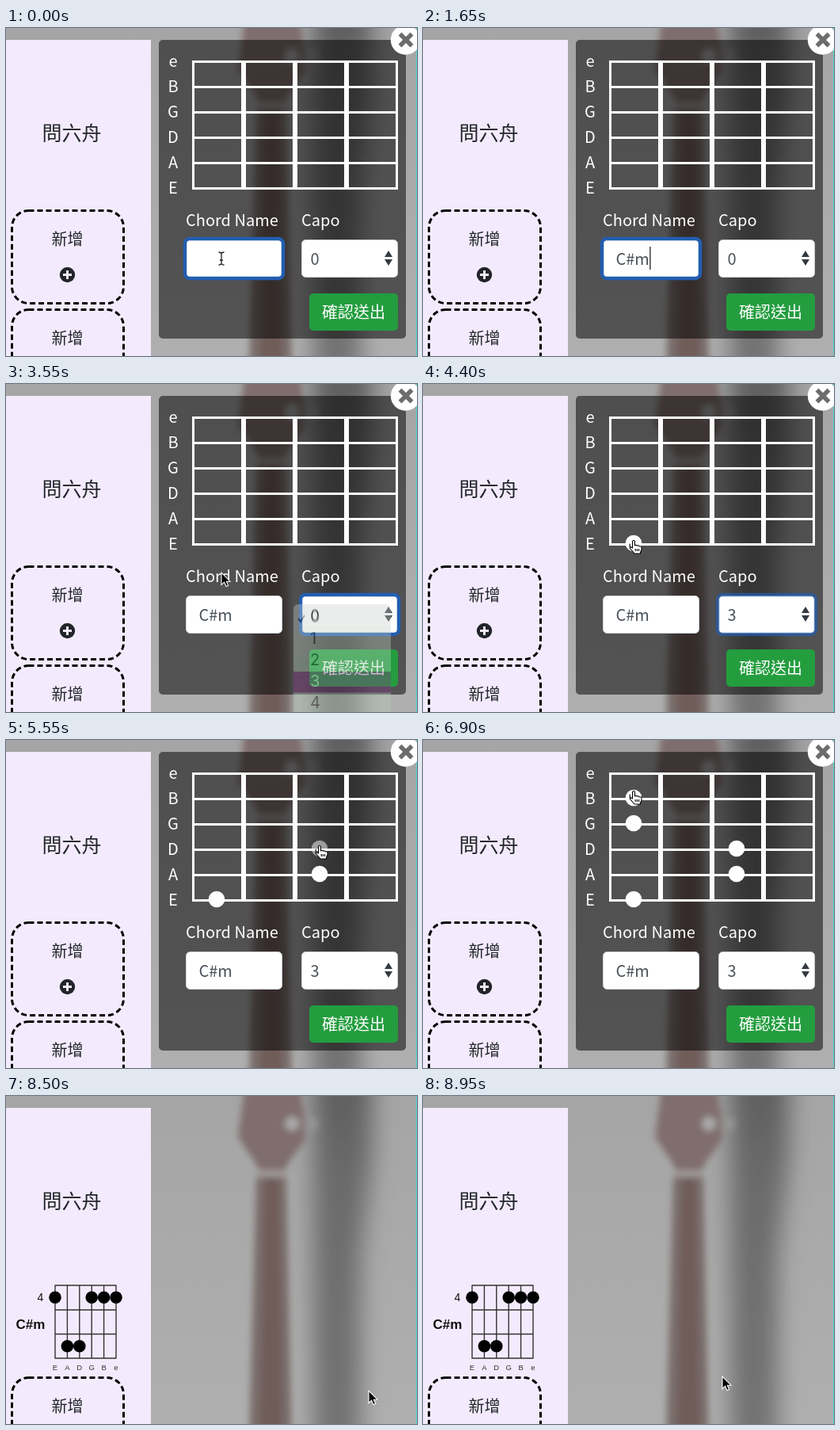
An HTML page for the animation above (9 s loop, 519 by 414 pixels).

```html
<!DOCTYPE html>
<html lang="zh-Hant">
<head>
<meta charset="utf-8">
<title>Chord editor</title>
<style>
  html, body { margin: 0; width: 100%; height: 100%; overflow: hidden; background: #a9a9a9; }
  svg { display: block; }
  text { font: 20px "Noto Sans CJK TC", "Noto Sans CJK SC", "Noto Sans CJK JP", "Noto Sans CJK", "Noto Sans", sans-serif; fill: #212529; }
  .mid { text-anchor: middle; }
  .light text { fill: #fff; }
  .light .field { fill: #495057; }
  #menu text { font-family: Inter, Roboto, sans-serif; fill: #111; }
  #diagram text { font: 14px "Liberation Sans", Arial, sans-serif; fill: #111; }
  #diagram .tiny { font-size: 9.5px; fill: #333; }
  #diagram .name { font-size: 17px; font-weight: bold; }
</style>
</head>
<body>
<svg width="519" height="414" viewBox="0 0 519 414">
  <defs>
    <filter id="soft" x="-30%" y="-30%" width="160%" height="160%"><feGaussianBlur stdDeviation="4"/></filter>
    <filter id="wide" x="-60%" y="-30%" width="220%" height="160%"><feGaussianBlur stdDeviation="15"/></filter>
    <linearGradient id="wall" x2="0" y2="1">
      <stop stop-color="#a5a5a5"/><stop offset="1" stop-color="#afafaf"/>
    </linearGradient>
    <linearGradient id="shade" x2="0" y2="1">
      <stop stop-color="#5c5c5c"/><stop offset=".3" stop-color="#6b6b6b"/><stop offset="1" stop-color="#737373"/>
    </linearGradient>
    <linearGradient id="glass" x2="0" y2="1">
      <stop stop-color="#cbd0cd"/><stop offset=".2" stop-color="#c6d0c9"/>
      <stop offset=".5" stop-color="#b1d2b9"/><stop offset="1" stop-color="#b9cabd"/>
    </linearGradient>
    <g id="card">
      <rect x="7.5" y="230.5" width="141" height="117" rx="21" fill="none" stroke="#000" stroke-width="3" stroke-dasharray="7 4"/>
      <text class="mid" x="77.5" y="274">新增</text>
      <circle cx="77.5" cy="311.5" r="9.7" fill="#212529"/>
      <path d="M72 311.5h11M77.5 306v11" stroke="#f3ebfd" stroke-width="3"/>
    </g>
    <path id="spin" d="M478 289l5-8 5 8zM478 292h10l-5 8z" fill="#343a40"/>
  </defs>

  <rect width="519" height="414" fill="url(#wall)"/>
  <path d="M388-40H462V80L448 200V460H388z" fill="url(#shade)" filter="url(#wide)"/>
  <g filter="url(#soft)">
    <path d="M302-15H370L377 25 378 55 358 82 352 94H320L312 80 293 52z" fill="#806d6d"/>
    <path d="M316 102H354L361 430H307z" fill="#796d6b"/>
    <path d="M327 104H344L349 430H321z" fill="#6f5c59"/>
    <path d="M318 98H354" stroke="#a29b9a" stroke-width="6"/>
    <circle cx="361" cy="35" r="9" fill="#aaa"/><circle cx="386" cy="35" r="8" fill="#969696"/>
  </g>
  <rect x="518" width="1" height="414" fill="#52d3cf"/>

  <rect y="15" width="183" height="399" fill="#f3ebfd"/>
  <text class="mid" x="83" y="142" style="font-size:25px">問六舟</text>
  <use id="firstCard" href="#card"/>
  <use href="#card" y="125"/>
  <g id="diagram">
    <path d="M62 239V331M77.4 239V331M92.8 239V331M108.2 239V331M123.6 239V331M139 239V331M61.5 239H139.5M61.5 270H139.5M61.5 300.5H139.5M61.5 331H139.5" stroke="#333" stroke-width="1.4"/>
    <text x="39.5" y="259">4</text>
    <text class="name" x="12.5" y="294">C#m</text>
  </g>

  <g id="panel" class="light">
    <rect x="193" y="15" width="312" height="377" rx="5" fill="#000" fill-opacity=".52"/>
    <path id="grid" stroke="#fff" fill="none"/>
    <g id="dots" fill="#fff"></g>
    <text x="227" y="250">Chord Name</text>
    <text x="373" y="250">Capo</text>

    <rect x="227.5" y="267.5" width="121" height="47" rx="5" fill="#fff" stroke="#ced4da"/>
    <rect id="inputRing" x="226" y="266" width="124" height="50" rx="6" fill="none" stroke="#235eb0" stroke-width="4.5"/>
    <text id="chord" class="field" x="243.5" y="299"></text>
    <path id="caret" stroke="#222" stroke-width="1.3"/>

    <rect x="373.5" y="267.5" width="121" height="47" rx="5" fill="#fff" stroke="#ced4da"/>
    <rect id="selectRing" x="372" y="266" width="124" height="50" rx="6" fill="none" stroke="#235eb0" stroke-width="4.5"/>
    <text id="capo" class="field" x="384.5" y="299"></text>
    <use href="#spin"/>

    <rect id="send" x="383" y="335" width="112" height="47" rx="5"/>
    <text class="mid" x="439" y="366" font-weight="500" style="font-weight:500">確認送出</text>

    <circle cx="504.5" cy="15" r="18.7" fill="#fff"/>
    <path d="M497.5 7.5l15 15m0-15l-15 15" stroke="#6c6c6c" stroke-width="5.5"/>
  </g>

  <g id="menu">
    <rect x="363" y="278" width="123" height="150" rx="6" fill="url(#glass)"/>
    <rect id="pick" x="363" width="123" height="26.5" fill="#87348a"/>
    <path id="check" d="M369 296l3 4 5-8" fill="none" stroke="#111" stroke-width="2"/>
  </g>

  <g id="cursor">
    <path id="arrow" d="M0 0V15.5L3.6 12.2 6 17.6 8.7 16.4 6.3 11.2H11z" fill="#000" stroke="#fff" stroke-width="1.1"/>
    <path id="beam" d="M-3.5-8Q0-8 0-5.5Q0-8 3.5-8M0-6V6M-3.5 8Q0 8 0 5.5Q0 8 3.5 8M-2 2H2" fill="none" stroke="#222" stroke-width="1.3"/>
    <g id="hand" stroke="#000" stroke-width="1.1" stroke-linejoin="round">
      <path d="M-1.5 1.5Q0-1 1.5 1.5V7Q3 5.5 4.4 7.2Q6 6 7.2 8Q9.6 7 10 9.5V12L8.5 15.5V17H1L-4.6 10.5Q-5-.0-4.6 9.4Q-3.5 8-1.5 10z" fill="#fff"/>
      <path d="M2.2 11v3M4.4 11v3M6.6 11v3"/>
    </g>
  </g>
</svg>
<script>
const LOOP = 9000, OPEN = 2350, CLOSE = 8300;
const $ = id => document.getElementById(id);
const show = (id, on) => $(id).setAttribute('visibility', on ? 'inherit' : 'hidden');
const clamp = v => Math.max(0, Math.min(1, v));
const ramp = (t, from, to) => clamp((t - from) / (to - from));

function add(parent, tag, attrs, text = '') {
  const el = document.createElementNS('http://www.w3.org/2000/svg', tag);
  for (const key in attrs) el.setAttribute(key, attrs[key]);
  el.textContent = text;
  return $(parent).appendChild(el);
}

// column, string (0 = high e), click time
const notes = [[0, 5, 4350], [2, 4, 5100], [2, 3, 5600], [0, 2, 6200], [0, 1, 6700], [0, 0, 7250]];
// time, x, y of the pointer
const path = [
  [0, 272, 291], [1980, 272, 291], [2280, 420, 291], [2400, 420, 293], [2700, 416, 364],
  [3280, 416, 364], [3540, 272, 238], [3850, 272, 236], [4150, 266, 197], [4500, 266, 197],
  [4950, 396, 165], [5200, 396, 165], [5420, 396, 133], [5600, 396, 133], [6000, 266, 101],
  [6300, 266, 101], [6500, 266, 69], [6850, 266, 69], [7050, 266, 37], [7600, 266, 37],
  [8050, 458, 372], [8550, 458, 372], [8850, 378, 354], [LOOP, 378, 354]
];
const keys = [[600, 'C'], [1150, 'C#'], [1500, 'C#m']];

const strings = ['e', 'B', 'G', 'D', 'A', 'E'];
let lines = '';
for (let i = 0; i < 6; i++) {
  lines += `M235 ${42.5 + 32 * i}H495`;
  add('panel', 'text', { x: 211, y: 49 + 32 * i, class: 'mid' }, strings[i]);
  add('diagram', 'text', { x: 62 + 15.4 * i, y: 346, class: 'tiny mid' }, strings[5 - i]);
}
$('grid').setAttribute('d', lines);
$('grid').setAttribute('stroke-width', 3);
[[235, 3], [297, 6], [362, 6], [427, 6], [492, 3]].forEach(([x, width]) =>
  $('panel').insertBefore(add('panel', 'rect', { x, y: 41, width, height: 163, fill: '#fff' }), $('dots')));

const dot = ([col, row]) => add('dots', 'circle', { cx: 266 + 65 * col, cy: 41 + 32 * row, r: 10.3 });
const noteDots = notes.map(dot);
const hoverDot = dot([0, 0]);
hoverDot.setAttribute('opacity', .5);
for (const [col, row] of notes)
  add('diagram', 'circle', { cx: 62 + 15.4 * (5 - row), cy: col ? 315.7 : 254.3, r: 7.8 });
const items = [0, 1, 2, 3, 4].map(n => add('menu', 'text', { x: 384, y: 301 + 27 * n }, n));

function pointer(t) {
  const i = path.findIndex(p => p[0] > t);
  const [t0, x0, y0] = path[i - 1], [t1, x1, y1] = path[i];
  const u = (t - t0) / (t1 - t0), k = u * u * (3 - 2 * u);
  return [x0 + (x1 - x0) * k, y0 + (y1 - y0) * k];
}

function draw(t) {
  const open = t < CLOSE, [x, y] = pointer(t);
  show('panel', open);
  show('firstCard', open);
  show('diagram', !open);

  const typed = keys.filter(k => k[0] <= t).pop();
  $('chord').textContent = typed ? typed[1] : '';
  const caretX = 244 + (typed ? $('chord').getComputedTextLength() : 0);
  $('caret').setAttribute('d', `M${caretX + .5} 276V305`);
  show('caret', open && t < 2300 && (t > 300 && t < 2100));
  $('inputRing').setAttribute('opacity', 1 - ramp(t, 2300, 2450));
  $('selectRing').setAttribute('opacity', ramp(t, 2300, 2450) - ramp(t, 4350, 4500));
  $('capo').textContent = t < 3650 ? 0 : 3;

  const menuAlpha = t < OPEN ? 0 : 1 - ramp(t, 3430, 3620);
  const picked = t > 3280 ? 3 : Math.max(0, Math.floor((y - 282) / 27));
  $('menu').setAttribute('opacity', menuAlpha);
  $('pick').setAttribute('y', 363 - 27 * (3 - picked));
  items.forEach((el, i) => el.style.fill = i === picked ? '#fff' : '#111');
  $('check').setAttribute('stroke', picked ? '#111' : '#fff');

  const col = Math.floor((x - 235) / 65), row = Math.round((y - 37) / 32);
  const onGrid = open && col >= 0 && col < 4 && row >= 0 && row < 6;
  const onSend = open && !menuAlpha && x > 383 && x < 495 && y > 335 && y < 382;
  const onInput = open && x < 349 && y > 267 && y < 315;
  noteDots.forEach((el, i) => el.setAttribute('opacity', t >= notes[i][2] ? 1 : 0));
  hoverDot.setAttribute('cx', 266 + 65 * col);
  hoverDot.setAttribute('cy', 41 + 32 * row);
  hoverDot.setAttribute('opacity', onGrid ? .5 : 0);
  $('send').setAttribute('fill', onSend ? '#208136' : '#249d3f');

  $('cursor').setAttribute('transform', `translate(${x} ${y})`);
  show('cursor', t < 600 || t > 1950);
  show('hand', onGrid || onSend);
  show('beam', onInput);
  show('arrow', !onGrid && !onSend && !onInput);
}

function frame() {
  draw(Math.floor(performance.now() % LOOP / 50) * 50);
  requestAnimationFrame(frame);
}
frame();
</script>
</body>
</html>
```
